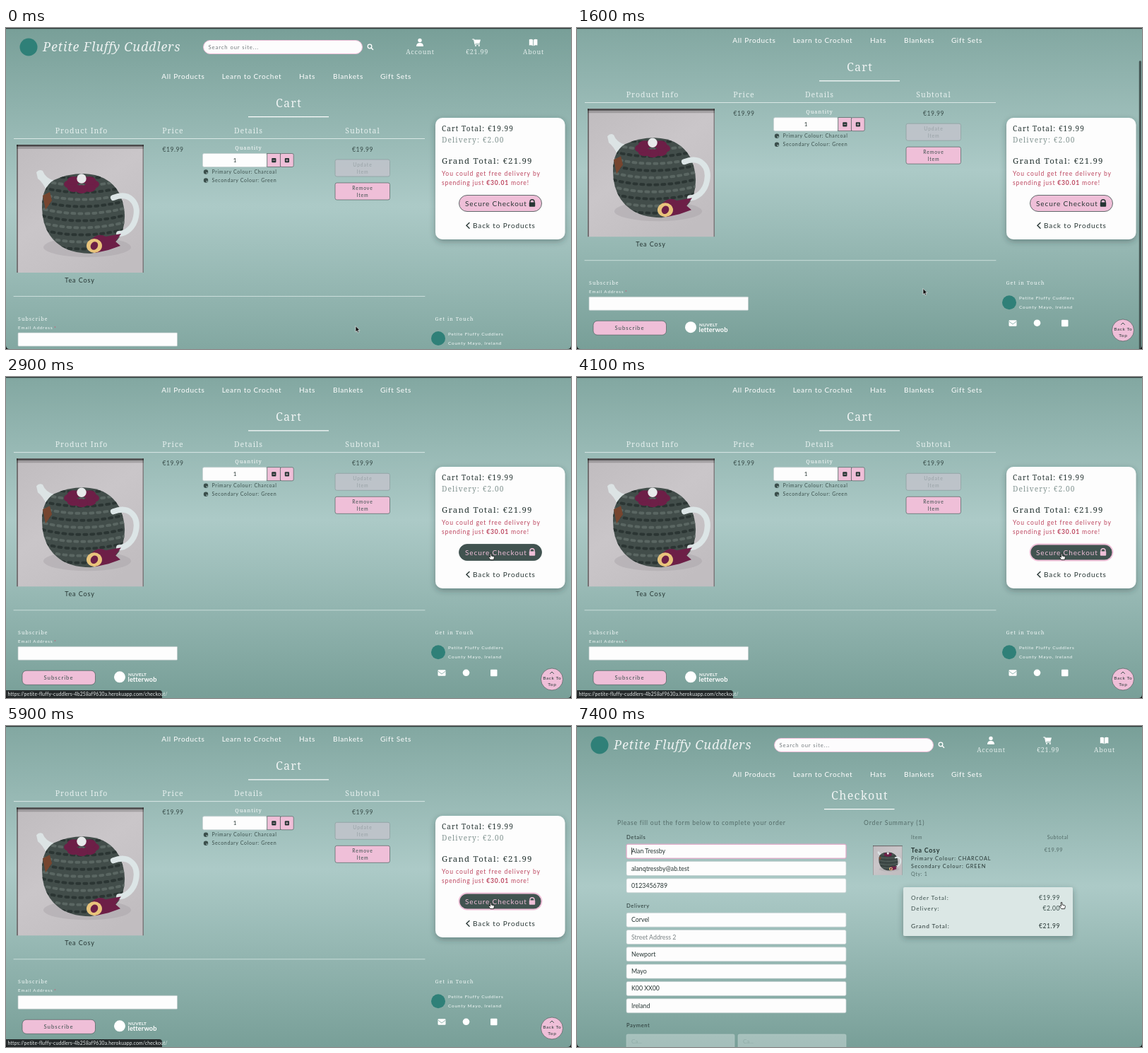
An HTML page that plays this animation: 800 by 454 pixels, repeating every 7500 ms.

```html
<!DOCTYPE html>
<html lang="en">
<head>
<meta charset="utf-8">
<title>Cart to checkout</title>
<style>
html, body { margin: 0; width: 100%; height: 100%; overflow: hidden; background: #789f98; }
svg { display: block; width: 100vw; height: 100vh; }
text { font-family: Lato, "Open Sans", sans-serif; white-space: pre; }
.serif { font-family: "Noto Serif", serif; font-weight: 300; fill-opacity: .85; }
.mid { text-anchor: middle; }
.end { text-anchor: end; }
.semi { font-weight: 500; fill-opacity: 1; }
.bold { font-weight: 700; }
</style>
</head>
<body>
<svg id="stage" viewBox="0 0 800 454"></svg>
<script>
const LOOP = 7500, SCROLL_END = 49.7, PAGE_CHANGE = 6200;
const DARK = '#3b4f4c', DEEP = '#263533', PALE = '#f4faf9', PINK = '#efbfd8', GREY = '#6d827f', WINE = '#6d1f47';
const SHOP = 'Petite Fluffy Cuddlers';

const text = (x, y, s, size, gap, fill, cls = '') =>
  `<text x="${x}" y="${y}" font-size="${size}" letter-spacing="${gap}" fill="${fill}" class="${cls}">${s}</text>`;
const rect = (x, y, w, h, r, fill, more = '') =>
  `<rect x="${x}" y="${y}" width="${w}" height="${h}" rx="${r}" fill="${fill}" ${more}/>`;
const dot = (x, y, r, fill, more = '') => `<circle cx="${x}" cy="${y}" r="${r}" fill="${fill}" ${more}/>`;
const oval = (x, y, rx, ry, fill, more = '') =>
  `<ellipse cx="${x}" cy="${y}" rx="${rx}" ry="${ry}" fill="${fill}" ${more}/>`;
const path = (d, fill, more = '') => `<path d="${d}" fill="${fill}" ${more}/>`;
const line = (d, color, w, more = '') =>
  path(d, 'none', `stroke="${color}" stroke-width="${w}" stroke-linecap="round" ${more}`);
const group = (id, body, more = '') => `<g id="${id}" ${more}>${body}</g>`;
const border = `stroke="${DARK}" stroke-width=".6"`;

// Photo in its own 180 x 181 box
function teapot() {
  const body = 'M36 88Q36 60 53 50Q72 41 95 41Q130 42 145 68Q158 95 150 122Q140 148 105 154Q65 154 47 128Q36 112 36 88Z';
  let knit = '';
  for (let i = 0; i < 11; i++) {
    const y = 40 + i * 10;
    knit += line(`M34 ${y}Q95 ${y + 16} 160 ${y - 2}`, i % 2 ? '#5a6662' : '#2b3533', 4, `stroke-dasharray="4 6" stroke-dashoffset="${i * 3}"`);
  }
  let petals = '';
  for (let i = 0; i < 8; i++) {
    const a = i * Math.PI / 4;
    petals += oval(92 + 16 * Math.cos(a), 56 + 7 * Math.sin(a), 9, 6, WINE);
  }
  return rect(0, 0, 180, 181, 0, 'url(#wall)') +
    oval(100, 145, 62, 14, '#a39fa2', 'opacity=".4"') +
    path('M28 39Q32 34 37 37Q41 48 54 51L43 66Q37 53 30 48Z', '#dce3e4') +
    path(body, '#424d4a') + `<clipPath id="cosy">${path(body, '#000')}</clipPath>` +
    group('knit', knit, 'clip-path="url(#cosy)"') +
    line('M137 75C160 66 173 82 169 102C166 118 154 126 145 126', '#dce5e6', 8) +
    path('M37 72L47 67L50 79L41 92Z', '#76452f') + petals +
    dot(92, 48, 6.7, '#e7e9ea') +
    path('M103 137Q115 123 126 130L148 126L140 137L147 143L130 149L112 153Z', WINE) +
    oval(110, 143, 11, 10, '#e9c47c') + oval(110, 143, 5, 6, WINE, 'transform="rotate(30 110 143)"') +
    rect(0, 0, 180, 6, 0, '#111', 'opacity=".2"') + rect(0, 0, 180, 2.5, 0, '#111', 'opacity=".6"') +
    rect(0, 0, 2, 181, 0, '#111', 'opacity=".45"') + rect(178.5, 0, 1.5, 181, 0, '#111', 'opacity=".4"');
}

function header() {
  const nav = [['All Products', 251], ['Learn to Crochet', 348], ['Hats', 426.5], ['Blankets', 484.5], ['Gift Sets', 552]];
  return dot(32, 27, 12.5, '#2f8078') +
    `<text x="52" y="33" font-size="18" letter-spacing=".75" fill="#fff" class="serif" font-style="italic">${SHOP}</text>` +
    rect(279.5, 17.5, 225, 19, 9.5, '#fdfcfd', `stroke="${PINK}"`) +
    text(286.5, 30, 'Search our site...', 7.7, .9, '#747b7e') +
    dot(515, 26, 2.8, 'none', 'stroke="#fff" stroke-width="1.3"') + line('M517.2 28.2L519.6 30.6', '#fff', 1.4) +
    dot(586, 17.5, 2.7, '#fff') + path('M581 26Q581 21 586 21Q591 21 591 26Z', '#fff') +
    line('M660.5 16H662.5L664 23H670.5', '#fff', 1.2) + path('M662.8 16.5H672L670.5 21.8H664Z', '#fff') +
    dot(665, 25, 1, '#fff') + dot(669.8, 25, 1, '#fff') +
    path('M740.8 16.2Q744 15 746.2 16.8V25.4Q744 23.8 740.8 24.6ZM752.4 16.2Q749 15 747 16.8V25.4Q749 23.8 752.4 24.6Z', '#fff') +
    text(586.5, 36.5, 'Account', 9, .8, PALE, 'serif mid') +
    text(667, 36.5, '€21.99', 9, .8, PALE, 'serif mid') +
    text(747, 36.5, 'About', 9, .8, PALE, 'serif mid') +
    nav.map(([s, x]) => text(x, 72, s, 10, .7, '#fff', 'mid')).join('');
}

function cartRow() {
  const heads = [['Product Info', 107], ['Price', 236.5], ['Details', 343.5], ['Subtotal', 505]];
  const colours = ['Primary Colour: Charcoal', 'Secondary Colour: Green'].map((s, i) =>
    dot(283, 203.5 + 12 * i, 3.2, DARK) + dot(284.4, 204.8 + 12 * i, .9, '#a9c8c5') +
    text(291.5, 206 + 12 * i, s, 7, .65, DARK)).join('');
  return text(400.5, 112, 'Cart', 16, 1.3, '#fff', 'serif mid') + rect(343, 125, 114, 1.2, 0, '#fff') +
    heads.map(([s, x]) => text(x, 149, s, 10.5, 1, PALE, 'serif mid')).join('') +
    rect(11, 156, 582, .8, 0, '#e9f2f1') +
    `<use href="#tea" x="15" y="165"/>` +
    text(104.5, 359.5, 'Tea Cosy', 9, .9, DEEP, 'mid') +
    text(236.5, 174.5, '€19.99', 8.6, .5, DARK, 'mid') + text(505, 174.5, '€19.99', 8.6, .5, DARK, 'mid') +
    text(343.5, 171.5, 'Quantity', 7.3, 1, '#fff', 'serif semi mid') +
    rect(278.5, 177.5, 91, 19, 2, '#fdfdfd', 'stroke="#c9d2d3" stroke-width=".8"') +
    text(324, 190, '1', 8, 0, DEEP, 'mid') +
    rect(369.8, 177.5, 18.6, 19, 0, PINK, border) + rect(388.4, 177.5, 18.8, 19, 2, PINK, border) +
    rect(376.2, 184, 6.2, 6.2, 1, DEEP) + rect(394.8, 184, 6.2, 6.2, 1, DEEP) +
    line('M378 187.1H380.6M396.6 187.1H399.2M397.9 185.8V188.4', PINK, .8) + colours +
    rect(466, 186, 77.5, 24, 2.5, '#c2c4cc', 'stroke="#8b9b9c" stroke-width=".8" opacity=".85"') +
    text(505, 196, 'Update', 6.8, .9, '#98a2a6', 'mid') + text(505, 206, 'Item', 6.8, .9, '#98a2a6', 'mid') +
    rect(466, 219, 77.5, 24, 2.5, PINK, border) +
    text(505, 229, 'Remove', 6.8, .9, DARK, 'mid') + text(505, 239, 'Item', 6.8, .9, DARK, 'mid') +
    line('M11 379.5H593', '#d9e7e5', .8);
}

function footer() {
  return text(17, 413.5, 'Subscribe', 7, 1.1, PALE, 'serif semi') +
    text(17, 426, 'Email Address', 6.2, .9, PALE) + text(68, 426, '*', 6.5, 0, '#d4476b') +
    rect(17, 431, 225.5, 19, 1, '#fdfdfd', 'stroke="#b9c6c6" stroke-width=".7"') +
    rect(23, 465, 103.5, 20, 6, PINK, border) + text(74.5, 478, 'Subscribe', 7.8, 1, DARK, 'mid') +
    dot(161, 474, 8, '#fff') +
    text(173, 472.5, 'NUVELT', 6.4, .3, '#fff', 'bold') + text(172.5, 480.5, 'letterwob', 9.2, .1, '#fff', 'bold') +
    text(607.5, 413.5, 'Get in Touch', 7, 1.1, PALE, 'serif semi') +
    dot(612, 439, 10, '#2f8078') +
    text(626, 434.5, SHOP, 6.5, .75, PALE) + text(626, 448, 'County Mayo, Ireland', 6.5, .75, PALE) +
    rect(611.5, 464, 11, 8.5, 1.2, '#fff') + line('M612 466L617 469.8L622 466', '#86aca6', .9) +
    dot(651.5, 468, 4.8, '#fff') + rect(686, 463.5, 9.5, 9.5, 1, '#fff');
}

function totalCard() {
  return rect(608, 127, 183.5, 172, 10, '#fdfdfd', 'filter="url(#soft)"') +
    text(617, 145.5, 'Cart Total: €19.99', 10, 1.1, DEEP, 'serif semi') +
    text(617, 162, 'Delivery: €2.00', 10.2, 1.1, GREY, 'serif') +
    text(617, 192, 'Grand Total: €21.99', 11.5, 1.2, DEEP, 'serif semi') +
    text(617, 209.3, 'You could get free delivery by', 8.6, .95, '#bd4760') +
    text(617, 222, 'spending just <tspan class="bold">€30.01</tspan> more!', 8.6, .8, '#bd4760') +
    rect(641.5, 236.5, 117, 23, 11.5, PINK, 'id="pay"') +
    group('payInk', text(650, 251.5, 'Secure Checkout', 10, .9, 'currentColor') +
      rect(740.8, 246.5, 8.4, 6.3, 1, 'currentColor') +
      line('M742 247V245.8A3 3 0 0 1 748 245.8V247', 'currentColor', 1.4)) +
    line('M656 275.5L652 279.3L656 283.2', DEEP, 1.4) +
    text(661, 283, 'Back to Products', 10, .9, DEEP);
}

function checkout() {
  const label = (y, s) => text(70, y, s, 7.6, .6, DEEP);
  const field = (y, s, fill = DEEP) =>
    rect(70, y, 311, 20, 2, '#fdfdfd', 'stroke="#c3cfd0" stroke-width=".7"') + text(77, y + 13, s, 8.8, 0, fill);
  const person = ['Alan Tressby', 'alanqtressby@ab.test', '0123456789'];
  const place = ['Corvel', 'Street Address 2', 'Newport', 'Mayo', 'K00 XX00', 'Ireland'];
  const rows = [['Order Total:', '€19.99', 246, DARK], ['Delivery:', '€2.00', 261, DARK], ['Grand Total:', '€21.99', 286, DEEP]];
  const cardField = x => rect(x, 436, 153, 20, 2, '#dfe9e8', 'stroke="#fff" stroke-width=".6"') + text(x + 7, 449, 'Ca...', 8, 0, '#a9b9b8');
  return text(400.5, 103.5, 'Checkout', 16, 1.3, '#fff', 'serif mid') + rect(350, 117, 99.5, 1.2, 0, '#fff') +
    text(57, 140, 'Please fill out the form below to complete your order', 8.6, .75, '#536b68') +
    text(406, 140, 'Order Summary (1)', 8.6, .9, '#536b68') +
    label(160, 'Details') + person.map((s, i) => field(167.2 + 24.3 * i, s)).join('') +
    group('focus', rect(70, 167.2, 311, 20, 2, 'none', 'stroke="#e79fc4" stroke-width="1"')) +
    rect(77, 172, .8, 10, 0, '#222', 'id="caret"') +
    label(257, 'Delivery') + place.map((s, i) => field(264.2 + 24.3 * i, s, i === 1 ? '#7b8385' : DEEP)).join('') +
    label(426.3, 'Payment') + group('cardFields', cardField(70) + cardField(228)) +
    text(473, 160, 'Item', 7, .6, '#536b68') + text(696, 160, 'Subtotal', 7, .6, '#536b68', 'end') +
    `<use href="#tea" transform="translate(419 169) scale(.231)"/>` +
    text(473, 178.5, 'Tea Cosy', 8.8, .8, DEEP, 'bold') +
    text(473, 190, 'Primary Colour: CHARCOAL', 7.3, .95, DEEP) +
    text(473, 201, 'Secondary Colour: GREEN', 7.3, .95, DEEP) +
    text(473, 212, 'Qty: 1', 7, .7, '#536b68') + text(688, 177.5, '€19.99', 7.4, .5, '#536b68', 'end') +
    rect(462, 228, 240, 69, 2, '#dbe7e5', 'filter="url(#soft)"') +
    rows.map(([s, sum, y, c]) => text(473, y, s, 8.3, .9, c) + text(684, y, sum, 8.6, .5, c, 'end')).join('');
}

const stop = (at, c) => `<stop offset="${at}" stop-color="${c}"/>`;
const $ = id => document.getElementById(id);

$('stage').innerHTML = `<defs>
  <linearGradient id="sky" x2="0" y2="1">${stop(0, '#789f98')}${stop(.5, '#accac7')}${stop(1, '#789f98')}</linearGradient>
  <linearGradient id="wall" x2=".7" y2="1">${stop(0, '#c0bcbf')}${stop(.5, '#cac6c9')}${stop(1, '#c1bdc0')}</linearGradient>
  <filter id="soft" x="-10%" y="-15%" width="120%" height="135%"><feDropShadow dx="0" dy="3" stdDeviation="4" flood-color="#203a36" flood-opacity=".4"/></filter>
  ${group('tea', teapot())}</defs>` +
  rect(0, 0, 800, 454, 0, 'url(#sky)') +
  group('page', group('cart', rect(0, 0, 800, 504, 0, 'url(#sky)') + rect(0, 504, 800, 9, 0, '#789f98') + cartRow() + footer()) + header()) +
  group('card', totalCard()) + group('checkout', checkout()) +
  group('toTop', dot(773, 427.5, 15.5, PINK, border) + line('M770.5 419.5L773 417L775.5 419.5', DARK, 1) +
    text(773.3, 428, 'Back To', 6.5, .6, DEEP, 'mid') + text(773.3, 437, 'Top', 6.5, .6, DEEP, 'mid')) +
  rect(795.8, 0, 3.2, 412, 1.6, '#3c4c4b', 'id="bar"') +
  group('url', path('M0 443H217Q221 443 221 447V454H0Z', '#252a2b') +
    text(2.5, 451, 'https://petite-fluffy-cuddlers-4b258af9630a.herokuapp.com/checkout/', 6.8, .2, '#e6eaea')) +
  rect(0, 0, 800, 1.2, 0, '#2c3534') + path('M0 449Q0 454 5 454H0ZM800 449Q800 454 795 454H800Z', '#111') +
  group('arrow', path('M0 0V8.4L1.9 6.7L3.2 9.6L4.7 8.9L3.4 6.1H6Z', '#111', 'stroke="#fff" stroke-width=".6"')) +
  group('hand', path('M-.8 .7Q0 -.4 .8 .7L1.2 4L4.5 4.7Q5.6 5 5.3 6.5L4.6 9.6H0L-2.6 6.3Q-2.6 5 -1.4 5.4L-.4 6Z', '#fff', 'stroke="#111" stroke-width=".8"'));

const clamp = v => Math.max(0, Math.min(1, v));
const ramp = (t, a, b) => clamp((t - a) / (b - a));
const smooth = (t, a, b) => { const k = ramp(t, a, b); return k * k * (3 - 2 * k); };
const mix = (a, b, k) => a + (b - a) * k;
const blend = (a, b, k) => `rgb(${a.map((v, i) => Math.round(mix(v, b[i], k)))})`;
const show = (id, opacity) => $(id).setAttribute('opacity', +opacity);
const move = (id, x, y) => $(id).setAttribute('transform', `translate(${x} ${y})`);

// Scrolls past the end, then springs back
const scrollKeys = [[200, 0], [800, 40], [1150, 52.5], [1600, 50.8], [2000, SCROLL_END]];
function scrollAt(t) {
  const i = scrollKeys.findIndex(k => k[0] > t);
  if (i < 0) return SCROLL_END;
  if (!i) return 0;
  const [a, b] = [scrollKeys[i - 1], scrollKeys[i]];
  return mix(a[1], b[1], ramp(t, a[0], b[0]));
}

function draw(t) {
  const onCart = t < PAGE_CHANGE, scroll = onCart ? scrollAt(t) : 0;
  move('page', 0, -scroll);
  for (const id of ['cart', 'card']) show(id, onCart);
  show('checkout', !onCart);
  show('toTop', onCart ? ramp(scroll, 10, 20) : 0);
  show('bar', ramp(t, 200, 300) * (1 - ramp(t, 2200, 2450)) * .9);
  move('bar', 0, 5 + scroll * .81);

  const up = smooth(t, 0, 450), across = smooth(t, 1900, 2550);
  const x = mix(mix(495, 490, up), 686, across), y = mix(mix(421.5, 368.5, up), 249, across);
  const over = t >= 2500;
  move('arrow', x, y);
  move('hand', x, y);
  show('arrow', !over);
  show('hand', over);

  const hover = ramp(t, 2500, 2700), focused = t >= 3600;
  const pink = [239, 191, 216], dark = [65, 83, 80];
  $('pay').setAttribute('fill', blend(pink, dark, hover));
  $('pay').setAttribute('stroke', focused ? PINK : DARK);
  $('pay').setAttribute('stroke-width', focused ? 1.8 : .8);
  $('payInk').style.color = blend([38, 53, 51], pink, hover);
  show('url', onCart && t >= 2650);

  show('focus', ramp(t, 6500, 6650));
  show('caret', t >= 6600 && (t - 6600) % 1000 < 500 || t >= 7300);
  show('cardFields', ramp(t, 7200, 7500) * .65);
}

(function tick() {
  draw(performance.now() % LOOP);
  requestAnimationFrame(tick);
})();
</script>
</body>
</html>
```
